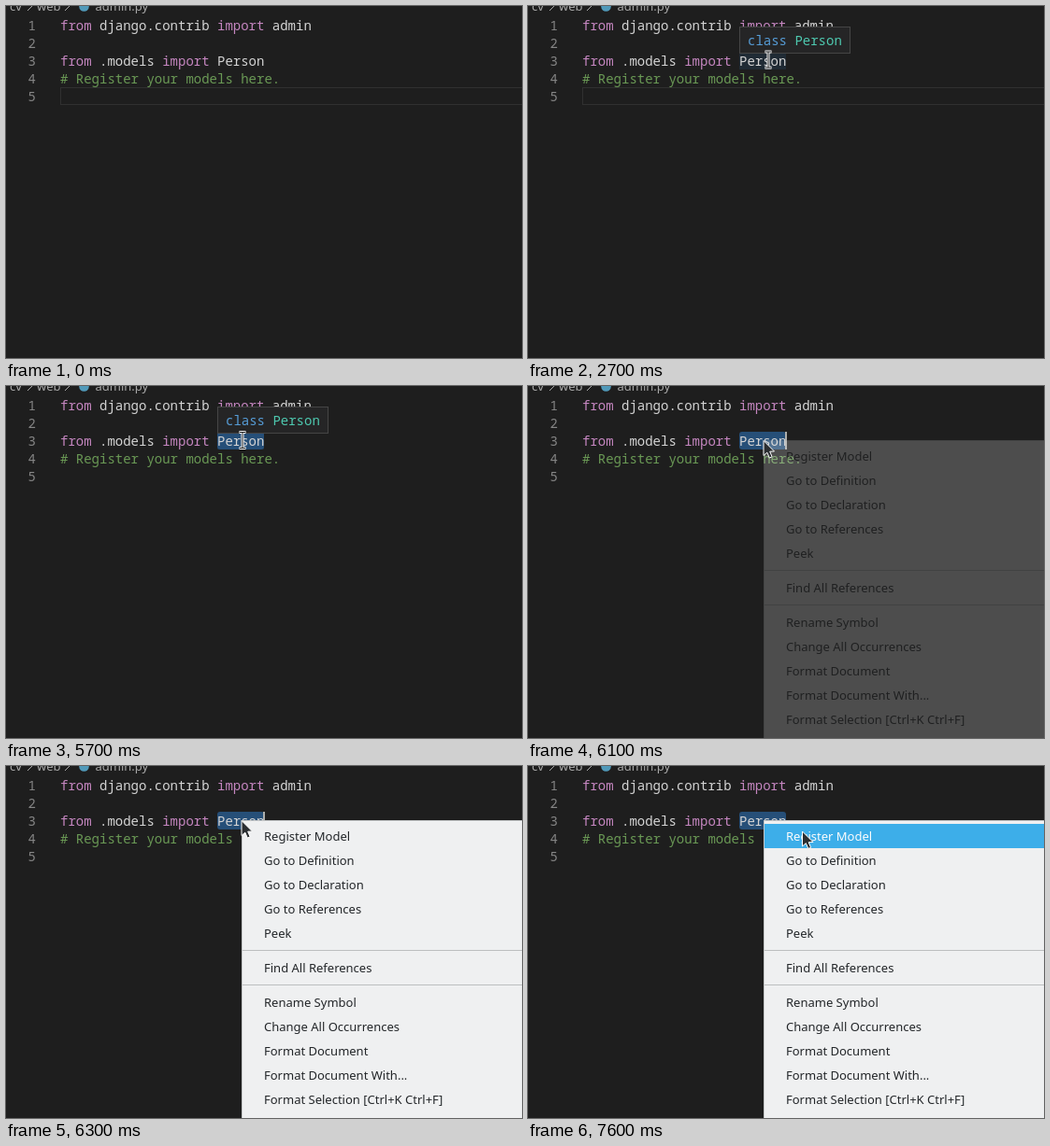
These frames come from a looping animation (552x377 px, 8000 ms). An HTML page:

```html
<!DOCTYPE html>
<html lang="en">
<head>
<meta charset="utf-8">
<title>Register a model from the editor</title>
<style>
  html, body { margin: 0; width: 100%; height: 100%; overflow: hidden; background: #1e1e1e; }
  #stage { position: relative; width: 552px; height: 377px; overflow: hidden; background: #1e1e1e; }
  #stage div, #stage svg { position: absolute; box-sizing: border-box; white-space: pre; }
  .mono { font: 14px/19px "Noto Sans Mono", monospace; color: #d4d4d4; }
  .ui { font: 13px/18px "Noto Sans", "Open Sans", sans-serif; }
  .num { left: 0; width: 32px; text-align: right; color: #858585; }
  .code { left: 58px; }
  .kw { color: #c586c0; }
  .note { color: #6a9955; }
  .crumb { top: -9px; color: #a9a9a9; }
  #line { left: 58px; width: 500px; height: 19px; border: 1px solid #303030; }
  #word, #sel { left: 226px; top: 49px; width: 50.4px; height: 19px; }
  #word { background: rgba(38, 79, 120, .25); }
  #sel { background: #264f78; border-radius: 3px; }
  #caret { top: 49px; width: 2px; height: 19px; background: #aeafad; }
  #tip { left: 226px; top: 22px; width: 119px; height: 29px; padding: 4px 8px;
         background: #252526; border: 1px solid #454545; }
  #menu { left: 252px; top: 58px; width: 320px; height: 340px; color: #232629;
          background: #eff0f1; border: 1px solid #c4c6c7; }
  .item { left: 0; width: 320px; height: 26px; padding: 4px 0 0 23px; }
  .sep { left: 0; width: 320px; height: 1px; background: #bcbebf; }
  .on { background: #3daee9; color: #fcfcfc; }
  #beam, #arrow { left: 0; top: 0; overflow: visible; }
</style>
</head>
<body>
<div id="stage">
  <div class="ui crumb" style="left:4px">cv</div>
  <div class="ui crumb" style="left:33px">web</div>
  <div class="ui crumb" style="left:95.5px">admin.py</div>
  <svg width="160" height="8" style="left:0;top:0">
    <path d="M23 5l5-5M63 5l5-5" stroke="#a9a9a9" fill="none"/>
    <circle cx="83.5" cy="0.5" r="5.3" fill="#519aba"/>
  </svg>
  <div id="line"></div>
  <div id="word"></div>
  <div id="sel"></div>
  <div id="text"></div>
  <div id="caret"></div>
  <div id="tip" class="mono"><span style="color:#569cd6">class</span> <span style="color:#4ec9b0">Person</span></div>
  <div id="menu" class="ui"></div>
  <svg id="beam" width="1" height="1">
    <path d="M-3.5-8.5H3.5M-3.5 8.5H3.5M0-8.5V8.5" stroke="#fff" stroke-width="3" fill="none"/>
    <path d="M-3-8.5H3M-3 8.5H3M0-8.5V8.5" stroke="#1b1d1f" stroke-width="1" fill="none"/>
  </svg>
  <svg id="arrow" width="1" height="1">
    <path d="M.5 .5V16.5L4.3 13.2L6.8 19L9.6 17.8L7.2 12.2L12 12Z"
          fill="#2b2e31" stroke="#fff" stroke-width="1" stroke-linejoin="round"/>
  </svg>
</div>
<script>
const LOOP = 8000, STEP = 100;
const $ = id => document.getElementById(id);

function add(parent, cls, top, html = "") {
  const el = document.createElement("div");
  el.className = cls;
  el.style.top = top + "px";
  el.innerHTML = html;
  parent.append(el);
  return el;
}

const kw = s => `<span class="kw">${s}</span>`;
[
  `${kw("from")} django.contrib ${kw("import")} admin`,
  "",
  `${kw("from")} .models ${kw("import")} Person`,
  `<span class="note"># Register your models here.</span>`,
  ""
].forEach((html, i) => {
  const top = 11 + 19 * i;
  add($("text"), "mono num", top, i + 1);
  add($("text"), "mono code", top, html);
});

let y = 3;
const items = [
  "Register Model", "Go to Definition", "Go to Declaration", "Go to References", "Peek", "-",
  "Find All References", "-",
  "Rename Symbol", "Change All Occurrences", "Format Document", "Format Document With...",
  "Format Selection [Ctrl+K Ctrl+F]"
].map(name => {
  const sep = name === "-";
  const el = sep ? add($("menu"), "sep", y + 5) : add($("menu"), "item", y, name);
  y += sep ? 11 : 26;
  return el;
});

// Pointer tracks: [time, x, y]
const beamPath = [
  [300, 453, 38.5], [500, 453, 38.5], [600, 452, 39], [700, 452, 39], [900, 440, 40.5],
  [1100, 400, 46], [1400, 334, 54.5], [1600, 294, 54.5], [1800, 271, 56],
  [2000, 260, 57], [2200, 257, 57], [2400, 257, 57.5], [5000, 257, 57.5], [5200, 253, 58]
];
const arrowPath = [
  [6700, 251.5, 58], [6800, 254, 60], [7000, 268, 68], [7200, 283, 72],
  [7400, 291, 71], [7600, 293, 69.5]
];

function at(path, t) {
  const i = path.findIndex(p => p[0] > t);
  if (i < 0) return path[path.length - 1];
  if (i === 0) return path[0];
  const a = path[i - 1], b = path[i], k = (t - a[0]) / (b[0] - a[0]);
  return a.map((v, n) => v + (b[n] - v) * k);
}

const within = (t, a, b) => t >= a && t < b;
const fade = (t, start, ...levels) => {
  const i = Math.floor((t - start) / STEP);
  return i < 0 ? 0 : i < levels.length ? levels[i] : 1;
};
const show = (id, alpha) => { $(id).style.opacity = +alpha; };
const place = (id, [, x, y]) => { $(id).style.transform = `translate(${x}px,${y}px)`; };

function caretOn(t) {
  if (t < 3000) return false;
  if (t < 3200) return true;
  const start = t < 6100 ? 3200 : 6100;
  return Math.floor((t - start) / 500) % 2 === 0;
}

function draw(t) {
  const hover = t < 3000 ? fade(t, 2600, .5) : t < 6100 ? fade(t, 5400, .5) : 0;
  show("tip", hover);
  show("word", hover);
  show("line", t < 3200);
  $("line").style.top = (t < 3000 ? 87 : 49) + "px";
  show("sel", t >= 3200);
  show("caret", caretOn(t));
  $("caret").style.left = (t < 3200 ? 259 : 275) + "px";
  show("menu", fade(t, 6100, .225, .7));
  items[0].classList.toggle("on", t >= 6900);
  show("beam", within(t, 300, 6100) ? fade(t, 300, .5) : 0);
  place("beam", at(beamPath, t));
  show("arrow", t >= 6100);
  place("arrow", at(arrowPath, t));
}

const began = performance.now();
function tick() {
  const t = (performance.now() - began) % LOOP;
  draw(Math.floor(t / STEP) * STEP);
  requestAnimationFrame(tick);
}
tick();
</script>
</body>
</html>
```
